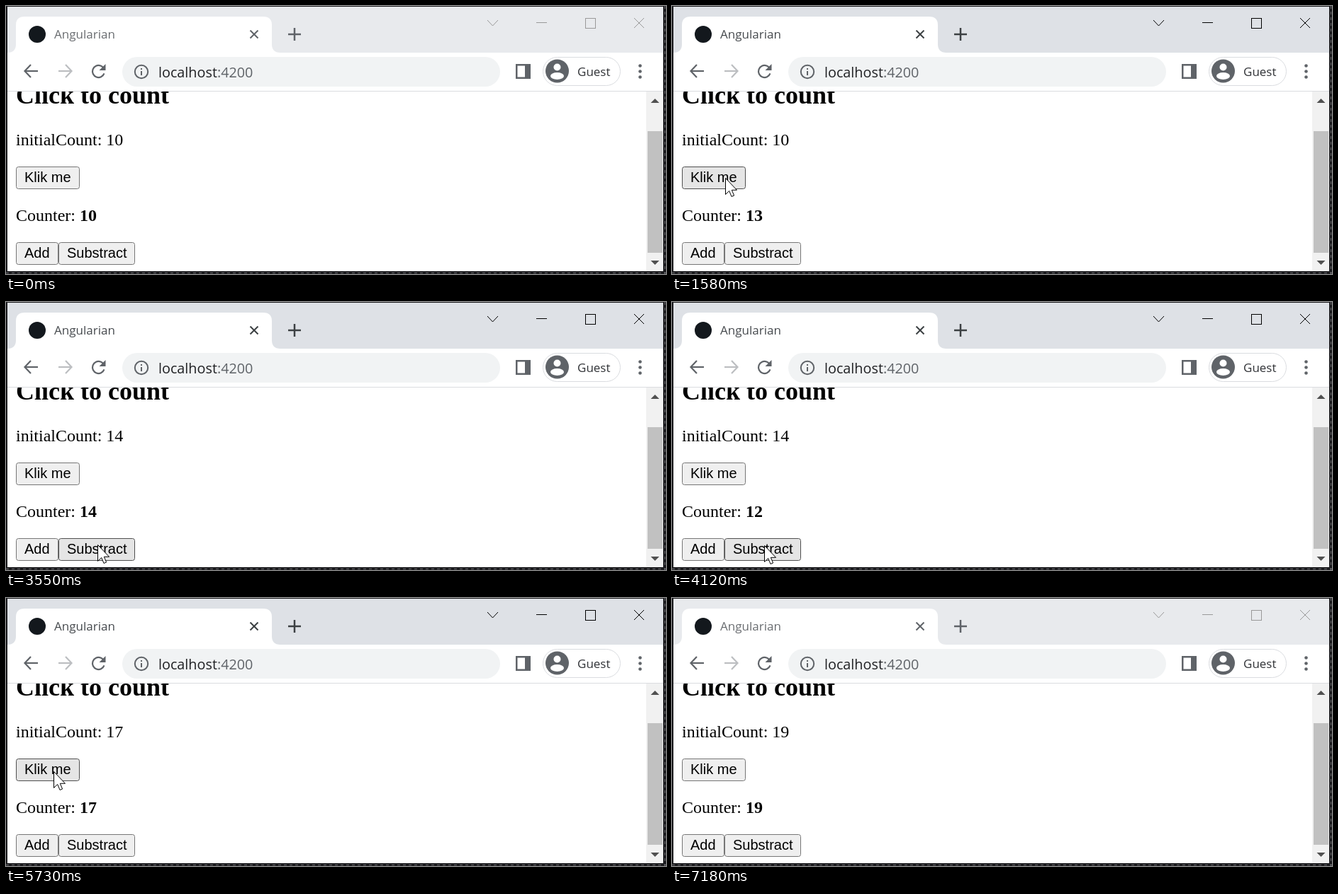
Recreate the animation shown at these times as an HTML page with a canvas. Size 931 px wide and 379 px high, loop 7230 ms.

```html
<!DOCTYPE html>
<html lang="en">
<head>
<meta charset="utf-8">
<title>Click to count</title>
<style>
html, body { margin: 0; width: 100%; height: 100%; overflow: hidden; background: #fff; }
canvas { display: block; width: 931px; height: 379px; }
</style>
</head>
<body>
<canvas id="stage" width="931" height="379"></canvas>
<script>
const ctx = document.getElementById('stage').getContext('2d');
const LOOP = 7230;
const STEP = 50;
const UI = '"Open Sans", "Noto Sans", sans-serif';
const SERIF = '"Liberation Serif", serif';
const SANS = '"Liberation Sans", sans-serif';

const buttons = [
  { id: 'klik', label: 'Klik me', x: 14, y: 227, w: 90 },
  { id: 'add', label: 'Add', x: 14, y: 334, w: 60 },
  { id: 'sub', label: 'Substract', x: 74, y: 334, w: 108 }
];

// Pointer stops: time, x, y
const path = [
  [410, 890, 366], [920, 48, 345], [1440, 48, 345], [1580, 75, 243],
  [1680, 78, 239], [3060, 78, 239], [3550, 129, 343], [3600, 130, 344],
  [4380, 130, 344], [4660, 71, 258], [4730, 74, 242], [5310, 74, 242],
  [5730, 67, 245], [6050, 67, 245], [6590, 650, 385]
];

// Button, press time, release time
const clicks = [
  ['add', 1090, 1240], ['add', 1290, 1340], ['add', 1390, 1440],
  ['klik', 1950, 2000], ['klik', 2430, 2480], ['klik', 2630, 2750], ['klik', 2900, 2950],
  ['sub', 3700, 3800], ['sub', 4020, 4080], ['sub', 4200, 4250],
  ['klik', 4780, 4830], ['klik', 4920, 4970], ['klik', 5050, 5100],
  ['klik', 5780, 5830], ['klik', 5880, 6050]
];

function pointerAt(t) {
  if (t < path[0][0] || t >= path[path.length - 1][0]) return null;
  const i = path.findIndex(p => p[0] > t);
  const [t0, x0, y0] = path[i - 1];
  const [t1, x1, y1] = path[i];
  const k = Math.floor((t - t0) / STEP) * STEP / (t1 - t0);
  const e = k * k * (3 - 2 * k);
  return { x: Math.round(x0 + (x1 - x0) * e), y: Math.round(y0 + (y1 - y0) * e) };
}

function countsAt(t) {
  let initial = 10, counter = 10;
  for (const [id, , up] of clicks) {
    if (t < up) break;
    if (id === 'add') counter++;
    else if (id === 'sub') counter--;
    else counter = ++initial;
  }
  return { initial, counter };
}

function focusAt(t) {
  if (t < 410 || t >= 7180) return 0;
  return t < 460 || t >= 7120 ? 0.5 : 1;
}

function mix(a, b, k) {
  return `rgb(${a.map((v, i) => Math.round(v + (b[i] - v) * k))})`;
}

function rect(x, y, w, h, color) {
  ctx.fillStyle = color;
  ctx.fillRect(x, y, w, h);
}

function round(x, y, w, h, r, fill, line) {
  ctx.beginPath();
  ctx.roundRect(x, y, w, h, r);
  if (fill) { ctx.fillStyle = fill; ctx.fill(); }
  if (line) { ctx.strokeStyle = line; ctx.lineWidth = 1; ctx.stroke(); }
}

function disc(x, y, r, color) {
  ctx.beginPath();
  ctx.arc(x, y, r, 0, Math.PI * 2);
  ctx.fillStyle = color;
  ctx.fill();
}

function trace(points) {
  ctx.beginPath();
  for (let i = 0; i < points.length; i += 2) ctx.lineTo(points[i], points[i + 1]);
}

function line(color, width, ...points) {
  trace(points);
  ctx.strokeStyle = color;
  ctx.lineWidth = width;
  ctx.stroke();
}

function shape(color, ...points) {
  trace(points);
  ctx.fillStyle = color;
  ctx.fill();
}

function text(str, x, y, font, color = '#000') {
  ctx.font = font;
  ctx.fillStyle = color;
  ctx.fillText(str, x, y);
}

function cross(x, y, r, color, width) {
  line(color, width, x - r, y - r, x + r, y + r);
  line(color, width, x + r, y - r, x - r, y + r);
}

function drawFrame() {
  rect(0, 0, 931, 379, '#1b1b1e');
  ctx.setLineDash([4, 4]);
  line('#6c6c70', 1, 929.5, 0, 929.5, 379);
  line('#6c6c70', 1, 0, 377.5, 931, 377.5);
  ctx.setLineDash([]);
  rect(2, 1, 925, 374, '#fff');
}

function drawTitleBar(focus) {
  const ink = mix([95, 99, 104], [60, 64, 67], focus);
  const control = mix([153, 153, 153], [0, 0, 0], focus);
  rect(2, 1, 925, 65, mix([232, 234, 237], [222, 225, 230], focus));

  ctx.beginPath();
  ctx.moveTo(2, 66);
  ctx.quadraticCurveTo(14, 66, 14, 54);
  ctx.lineTo(14, 27);
  ctx.quadraticCurveTo(14, 15, 26, 15);
  ctx.lineTo(363, 15);
  ctx.quadraticCurveTo(375, 15, 375, 27);
  ctx.lineTo(375, 54);
  ctx.quadraticCurveTo(375, 66, 387, 66);
  ctx.fillStyle = '#fff';
  ctx.fill();

  disc(44, 40, 12, '#13181d');
  text('Angularian', 68, 46, `17px ${UI}`, mix([105, 108, 112], [69, 73, 77], focus));
  cross(350, 40, 5.5, ink, 2);
  line(ink, 2.5, 398, 40, 416, 40);
  line(ink, 2.5, 407, 31, 407, 49);

  line(control, 1, 679, 20, 686.5, 28, 694, 20);
  line(control, 1, 748, 23.5, 763, 23.5);
  ctx.strokeStyle = control;
  ctx.strokeRect(817.5, 17.5, 14, 14);
  cross(893, 24, 7, control, 1);
}

function drawToolbar() {
  const ink = '#5f6368';
  line(ink, 2.2, 45, 92, 27, 92);
  line(ink, 2.2, 35, 83, 26.5, 92, 35, 101);
  line('#bcbec1', 2.2, 74, 92, 92, 92);
  line('#bcbec1', 2.2, 84, 83, 92.5, 92, 84, 101);

  ctx.beginPath();
  ctx.arc(130.5, 92.5, 8.5, 0.35, Math.PI * 1.77);
  ctx.strokeStyle = ink;
  ctx.lineWidth = 2.2;
  ctx.stroke();
  shape(ink, 140.5, 82, 140.5, 91, 131.5, 91);

  round(164, 72, 533, 42, 21, '#f1f3f4');
  ctx.beginPath();
  ctx.arc(191, 93, 9.2, 0, Math.PI * 2);
  ctx.strokeStyle = ink;
  ctx.lineWidth = 2;
  ctx.stroke();
  rect(190, 92, 2, 6, ink);
  rect(190, 88, 2, 2, ink);

  const urlFont = `19.8px ${UI}`;
  text('localhost', 215, 101, urlFont, '#202124');
  text(':4200', 215 + ctx.measureText('localhost').width, 101, urlFont, ink);

  ctx.strokeStyle = ink;
  ctx.lineWidth = 2.5;
  ctx.strokeRect(720.25, 83.25, 18.5, 18.5);
  rect(732, 82, 8, 21, ink);

  round(757.5, 72.5, 109, 40, 20, '#fff', '#dadce0');
  disc(777.5, 92, 16.5, ink);
  disc(777.5, 86.5, 5, '#fff');
  ctx.beginPath();
  ctx.ellipse(777.5, 99, 9.5, 5, 0, 0, Math.PI * 2);
  ctx.fillStyle = '#fff';
  ctx.fill();
  text('Guest', 806, 99, `17px ${UI}`, '#303236');
  for (const y of [84.5, 92.5, 100.5]) disc(894.5, y, 2.3, ink);
  rect(2, 120, 925, 1, '#dadce0');
}

function drawScrollbar() {
  rect(903, 121, 24, 254, '#f1f1f1');
  rect(905, 177, 21, 172, '#c1c1c1');
  shape('#505050', 909.5, 137, 915.5, 131, 921.5, 137);
  shape('#505050', 909.5, 360, 915.5, 366, 921.5, 360);
}

function drawButton(b, pointer, press) {
  const over = pointer && pointer.x >= b.x && pointer.x < b.x + b.w &&
    pointer.y >= b.y && pointer.y < b.y + 31;
  let fill = '#efefef', edge = '#767676';
  if (press && press[0] === b.id) { fill = '#f5f5f5'; edge = '#8d8d8d'; }
  else if (over) { fill = '#e5e5e5'; edge = '#4f4f4f'; }
  round(b.x + 0.5, b.y + 0.5, b.w - 1, 31, 3, fill, edge);
  text(b.label, b.x + 12, b.y + 22, `20px ${SANS}`);
}

function drawPage(t, pointer, press) {
  const { initial, counter } = countsAt(t);
  ctx.save();
  ctx.beginPath();
  ctx.rect(2, 121, 901, 254);
  ctx.clip();
  text('Click to count', 14, 138, `bold 36px ${SERIF}`);
  text(`initialCount: ${initial}`, 14, 197, `24px ${SERIF}`);
  text('Counter: ', 14, 304, `24px ${SERIF}`);
  text(counter, 104, 304, `bold 24px ${SERIF}`);
  for (const b of buttons) drawButton(b, pointer, press);
  ctx.restore();
}

function drawPointer({ x, y }, press) {
  if (press) disc(x + 0.5, y - 1, 18, 'rgba(255, 245, 0, 0.5)');
  ctx.save();
  ctx.translate(x, y);
  trace([0.5, 0.5, 0.5, 23.5, 5.7, 18.5, 9, 26.5, 12.6, 25, 9.3, 17.3, 16.5, 17.3]);
  ctx.closePath();
  ctx.fillStyle = '#fff';
  ctx.fill();
  ctx.strokeStyle = '#000';
  ctx.lineWidth = 1;
  ctx.stroke();
  ctx.restore();
}

function draw(t) {
  const pointer = pointerAt(t);
  const press = clicks.find(c => t >= c[1] && t < c[2]);
  drawFrame();
  drawTitleBar(focusAt(t));
  drawToolbar();
  drawPage(t, pointer, press);
  drawScrollbar();
  if (pointer) drawPointer(pointer, press);
}

const start = performance.now();
function tick() {
  draw((performance.now() - start) % LOOP);
  requestAnimationFrame(tick);
}
tick();
</script>
</body>
</html>
```
